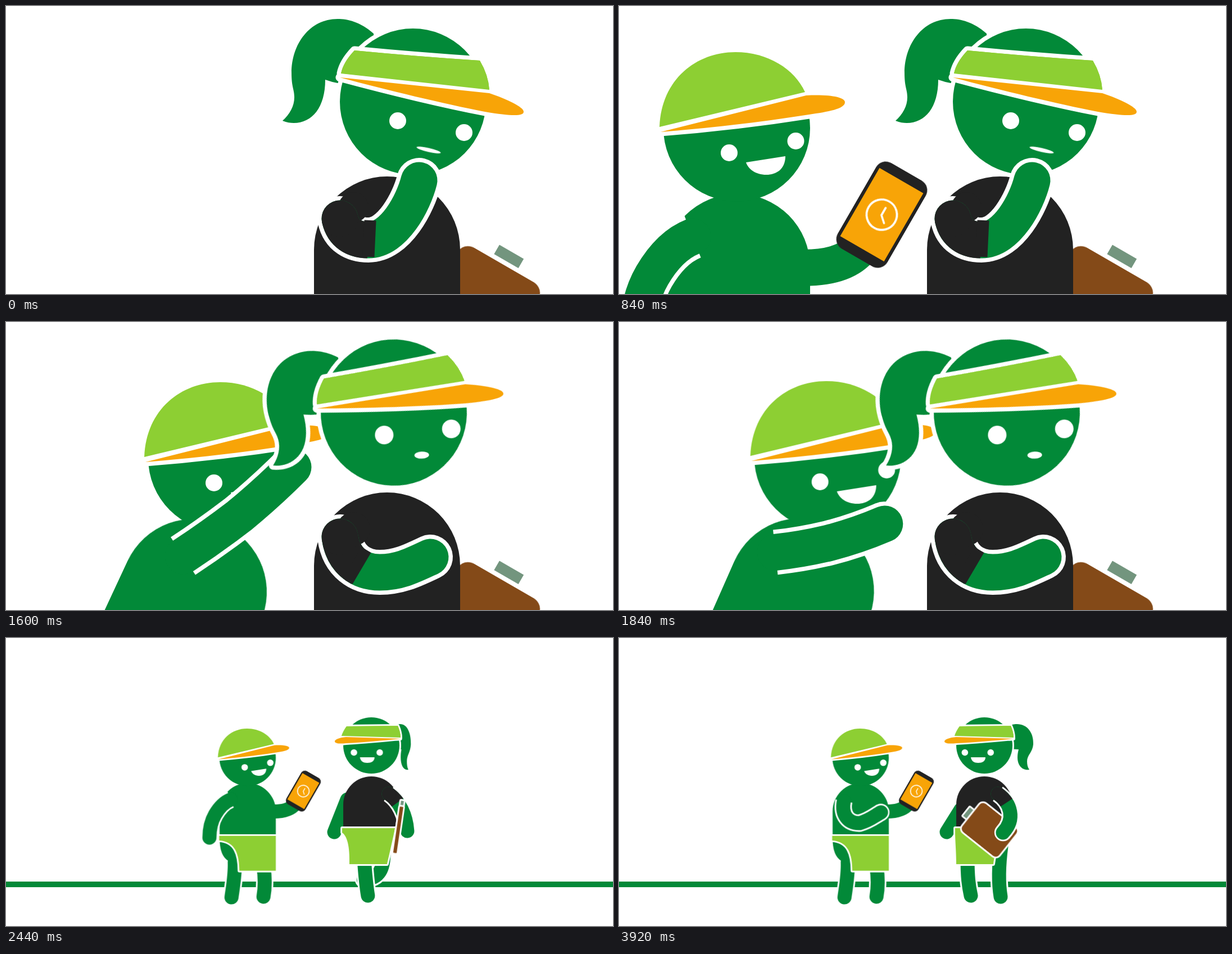
Recreate the animation shown at these times as an HTML page without scripts. Size 1080 by 512 pixels, loop 3960 ms.

```html
<!DOCTYPE html>
<html lang="en">
<head>
<meta charset="utf-8">
<title>Two friends meet</title>
<style>
html,body{margin:0;width:100%;height:100%;overflow:hidden;background:#fff}
svg{display:block;width:100vw;height:100vh}
svg *{animation:3.96s linear infinite}

/* paint */
.g{fill:#028938}.l{fill:#8dcf33}.o{fill:#f8a407}.k{fill:#222}.w{fill:#fff}
.brown{fill:#844a18}.grip{fill:#73957e}
.edge{stroke:#fff;stroke-width:15;paint-order:stroke;stroke-linejoin:round}
.small .edge{stroke-width:5.8}

/* limbs are thick strokes: white rim, green skin, dark sleeve */
.rim,.tip,.skin,.sleeve,.knob{fill:none;stroke-width:65}
.rim,.tip{stroke:#fff;stroke-width:80}
.skin{stroke:#028938;stroke-linecap:round}
.tip,.knob,.round{stroke-linecap:round}
.tip{stroke-dasharray:0 200;stroke-dashoffset:-99.5}
.sleeve,.knob{stroke:#222}
.sleeve{stroke-dasharray:68 999}
.knob{stroke-dasharray:0 999}
.small .rim,.small .tip{stroke-width:31}
.small .skin,.small .sleeve,.small .knob{stroke-width:25}
.small .sleeve{stroke-dasharray:22 999}

/* camera */
.cam{transform-origin:632.5px 210.4px;animation-name:cam}
@keyframes cam{0%,49.2%{transform:none}61.6%,to{transform:scale(.3846)}}
.right{animation-name:leave}
.left{animation-name:arrive}
@keyframes leave{0%,57.6%{opacity:1}57.61%,to{opacity:0}}
@keyframes arrive{0%,57.6%{opacity:0}57.61%,to{opacity:1}}

/* man */
.man{animation-name:man}
@keyframes man{
 0%{transform:translateX(-570px);animation-timing-function:cubic-bezier(.25,.6,.35,1)}
 17%,53.54%{transform:none}
 61.6%,to{transform:translateX(-104px)}}
.mhead{animation-name:mhead}
@keyframes mhead{
 0%,23.2%{transform:none;animation-timing-function:ease-in-out}
 34.3%,45.45%{transform:translate(174px,25px)}
 53.54%{transform:translate(78px,10px)}
 61.6%,to{transform:none}}
.mbody{transform-origin:210px 464px;animation-name:mbody}
@keyframes mbody{
 0%,23.2%{transform:translate(0,0) rotate(0deg);animation-timing-function:ease-in-out}
 34.3%,45.45%{transform:translate(124px,16px) rotate(25deg)}
 53.54%{transform:translate(44px,6px) rotate(16deg)}
 61.6%,to{transform:translate(0,0) rotate(0deg)}}
.marm{animation-name:marm}
@keyframes marm{
 0%,23.2%{d:path("M131 410C98 423 76 450 59 479C41 510 33 546 33 586");animation-timing-function:ease-in-out}
 34.3%,42.4%{d:path("M315 416C347 395 381 371 415 345C448 318 480 289 511 258")}
 53.54%{d:path("M215 398C237 426 266 453 299 476C332 500 368 519 407 533")}
 61.6%,77.3%{d:path("M131 410C98 423 76 450 59 479C41 510 33 546 33 586")}
 80.8%{d:path("M127 412C111 443 106 490 111 514C119 547 171 529 202 514")}
 88%,to{d:path("M132 417C119 482 153 521 205 519C249 508 275 485 304 469")}}
.far{animation-name:far}
@keyframes far{
 0%,23.2%{d:path("M300 464C370 470 410 455 430 430")}
 34.3%,45.45%{d:path("M340 520C370 560 400 610 450 650")}
 53.54%{d:path("M270 520C330 545 390 560 450 548")}
 61.6%,88%,93%,99%,to{d:path("M300 464C370 470 410 455 430 430")}
 90.5%,96%{d:path("M300 464C370 468 410 440 430 410")}}
.phone{animation-name:phone}
@keyframes phone{
 0%,23.2%{transform:translate(467.5px,371px) rotate(30deg)}
 34.3%,45.45%{transform:translate(480px,660px) rotate(70deg)}
 53.54%{transform:translate(512px,523px) rotate(66deg)}
 61.6%,88%,93%,99%,to{transform:translate(467.5px,371px) rotate(30deg)}
 90.5%,96%{transform:translate(467.5px,351px) rotate(30deg)}}

/* woman facing right */
.head{transform-origin:724px 170px;animation-name:head}
@keyframes head{
 0%,35.35%{transform:translate(0,0) rotate(0deg);animation-timing-function:ease-in-out}
 40.4%,49.2%{transform:translate(-34px,-9px) rotate(-15.3deg)}
 53.54%,to{transform:translate(-36.5px,-9.5px) rotate(-14deg)}}
.pony{animation-name:pony}
@keyframes pony{0%,49.2%{transform:none}53.54%{transform:translate(73px,28px)}57.6%,to{transform:translate(145px,45px)}}
.brim{transform-origin:594px 127px;animation-name:brim}
@keyframes brim{0%,49.2%{transform:rotate(0deg) scale(1,1)}53.54%{transform:rotate(-1.3deg) scale(.93,1.07)}57.6%,to{transform:rotate(-2deg) scale(.84,1.1)}}
.face{animation-name:face}
@keyframes face{0%,49.2%{transform:none}53.54%{transform:translateX(-10px)}57.6%,to{transform:translateX(-28px)}}
.eye{r:15px;animation-name:eye}
@keyframes eye{0%,35.35%{r:15px}40.4%,49.2%{r:16.5px}53.54%,to{r:15px}}
.lips{transform-origin:752px 256px;animation-name:lips}
@keyframes lips{0%,35.35%{transform:rotate(13deg) scale(1,1)}40.4%,49.2%{transform:rotate(13deg) scale(.59,1.8)}53.54%,to{transform:rotate(13deg) scale(.46,2.1)}}
.arm{animation-name:arm}
@keyframes arm{
 0%,35.35%{d:path("M594 378C600 405 620 416 645 416C690 416 725 350 735 310");animation-timing-function:ease-in-out}
 40.4%,49.2%{d:path("M594 382C600 425 630 445 665 445C700 445 725 432 755 418")}
 53.54%,to{d:path("M594 378C575 388 560 405 547 427C530 458 520 500 515 555")}}
.cuff{animation-name:cuff}
@keyframes cuff{
 0%,35.35%{d:path("M636 413L657 414");animation-timing-function:ease-in-out}
 40.4%,49.2%{d:path("M616 428L633 438")}
 53.54%,to{d:path("M555 407L547 427")}}
.patch{animation-name:patch}
@keyframes patch{0%,35.35%{cx:618px;cy:358px;r:27px}40.4%,49.2%{cx:618px;cy:368px;r:30px}53.54%,to{cx:615px;cy:395px;r:38px}}
.bag{animation-name:bag}
@keyframes bag{0%,49.2%{transform:translate(832px,554px) rotate(30deg)}53.54%,to{transform:translate(840px,552px) rotate(30deg)}}

/* woman facing left */
.pony2{transform-origin:690px 190px;animation-name:pony2}
@keyframes pony2{0%,57.6%{transform:scaleX(.2)}61.6%{transform:scaleX(.64)}65%,to{transform:none}}
.brim2{transform-origin:702px 179px;animation-name:brim2}
@keyframes brim2{0%,57.6%{transform:scaleX(.88)}61.6%{transform:scaleX(.952)}65%,to{transform:none}}
.face2{animation-name:face2}
@keyframes face2{0%,57.6%{transform:translateX(14px)}61.6%{transform:translateX(3.7px)}65%,to{transform:none}}
.leg1{animation-name:leg1}
@keyframes leg1{0%,61.6%{d:path("M637 390C639 420 641 440 644 458")}68.2%,to{d:path("M620 390C620 425 622 440 626 458")}}
.leg2{animation-name:leg2}
@keyframes leg2{0%,61.6%{d:path("M672 380C672 410 665 428 636 429")}68.2%,to{d:path("M680 370C676 400 674 430 679 460")}}
.shorts{animation-name:shorts}
@keyframes shorts{
 0%,61.6%{d:path("M598 338L692 338C690 350 682 385 678 402L611 402C612 370 607 352 598 346Z")}
 68.2%,to{d:path("M598 338L697 338C681 350 669 375 666 402L600 402C600 380 598 360 598 346Z")}}
.back{animation-name:back}
@keyframes back{0%,61.6%{d:path("M607 287L584 345")}68.2%,to{d:path("M608 305L583 345")}}
.arm2{animation-name:arm2}
@keyframes arm2{
 0%,61.6%{d:path("M681 277C700 290 712 315 714 343")}
 73.2%,to{d:path("M674 277C697 293 706 322 683 346")}}
.case{animation-name:case}
@keyframes case{0%,61.6%{transform:translate(698px,341px) rotate(8.5deg)}73.2%,to{transform:translate(659px,341px) rotate(-51.5deg)}}
.shell{animation-name:shell}
@keyframes shell{0%,61.6%{x:-3px;width:6px;rx:1px}73.2%,to{x:-32px;width:64px;rx:8px}}
.hold{animation-name:hold}
@keyframes hold{0%,61.6%{x:-2.5px;width:5px}73.2%,to{x:-9.6px;width:19.2px}}
.over{animation-name:over}
@keyframes over{0%,66%{opacity:1}66.01%,to{opacity:0}}
</style>
</head>
<body>
<svg viewBox="0 0 1080 512">
<defs>
 <g id="legs">
  <path class="rim round" d="M283 720C292 780 290 820 283 859"/>
  <path class="skin" d="M283 720C292 780 290 820 283 859"/>
  <path class="rim round" d="M150 700C152 760 142 810 135 862"/>
  <path class="skin" d="M150 700C152 760 142 810 135 862"/>
  <path class="g" d="M80 595C82 650 95 675 118 692L170 710V595Z"/>
  <path class="l edge" d="M78 578H340V739H171C171 664 153 604 78 599Z"/>
 </g>
</defs>

<g class="cam">
 <path d="M-1100 802H1900" stroke="#028938" stroke-width="26"/>

 <g class="man">
  <path class="skin far" d="M300 464C370 470 410 455 430 430"/>
  <g class="phone">
   <rect class="k" x="-51" y="-88" width="102" height="176" rx="20"/>
   <rect class="o" x="-45" y="-70" width="90" height="140"/>
   <g fill="none" stroke="#fff" stroke-width="3.7">
    <circle r="27"/>
    <path d="M0-14V1L11 11" stroke-linecap="round"/>
   </g>
  </g>
  <g class="mbody">
   <path class="g" d="M80 573V464A130 130 0 0 1 340 464V573Z"/>
   <use href="#legs"/>
  </g>
  <g class="mhead">
   <circle class="g" cx="209.5" cy="217" r="130.5"/>
   <path class="w" d="M60 229L72 215C75 130 140 74 208 74C265 74 345 112 345 165L338 198L76 229Z"/>
   <path class="o edge" d="M74 224L333 159C375 157 402 162 402 171C402 183 372 188 338 193C250 207 150 218 74 224Z"/>
   <path class="l" d="M72 215C75 130 138 82 207 82C265 82 312 112 331 153Z"/>
   <circle class="w" cx="196" cy="261" r="15"/>
   <circle class="w" cx="314.5" cy="240" r="15"/>
   <path class="w" d="M226 278L296 267C296 290 280 300 262 300C243 300 230 290 226 278Z"/>
  </g>
  <path class="rim marm"/>
  <path class="tip marm" pathLength="100"/>
  <path class="skin marm"/>
 </g>

 <g class="right">
  <g class="bag">
   <rect class="grip" x="-25" y="-135" width="50" height="19"/>
   <rect class="brown" x="-83" y="-108" width="166" height="216" rx="21.5"/>
  </g>
  <use href="#legs" x="468" y="-36"/>
  <path class="k" d="M548 536V433A130 130 0 0 1 808 433V536Z"/>
  <g class="head">
   <path class="g edge pony" d="M654 49C630 28 608 23 590 23C540 23 508 68 508 119C508 145 513 148 513 162C513 178 505 192 492 204C500 207 506 208 512 208C545 208 568 180 568 131Q579 135 590 137L660 120Z"/>
   <circle class="g edge" cx="724" cy="170" r="130"/>
   <path class="l edge" d="M620 79Q735 90 843 97Q858 122 860 149L596 120Q600 100 620 79Z"/>
   <path class="o edge brim" d="M594 127L860 155C890 165 922 180 921 188C921 196 900 196 852 188C780 174 680 150 594 127Z"/>
   <path class="l" d="M620 79Q735 90 843 97Q858 122 860 149L596 120Q600 100 620 79Z"/>
   <g class="face">
    <circle class="w eye" cx="697" cy="204"/>
    <circle class="w eye" cx="815" cy="225"/>
    <ellipse class="w lips" cx="752" cy="256" rx="22" ry="3.5"/>
   </g>
  </g>
  <path class="rim round arm"/>
  <circle class="k patch"/>
  <path class="skin arm"/>
  <path class="sleeve arm"/>
  <path class="sleeve cuff"/>
  <path class="knob arm"/>
 </g>

 <g class="left small" transform="translate(-1012 -336.6) scale(2.6)">
  <path class="skin back"/>
  <path class="rim round leg2"/>
  <path class="skin leg2"/>
  <path class="rim round leg1"/>
  <path class="skin leg1"/>
  <path class="k" d="M600 338V296A50 50 0 0 1 700 296L693 338Z"/>
  <path class="l edge shorts"/>
  <path class="g edge pony2" d="M694 156C700 153 705 153 708 153C726 153 738 168 737 189C736 203 726 208 726 219C726 225 727 230 730 234C717 236 709 226 709 212C709 206 710 202 711 198L690 197Z"/>
  <circle class="g edge" cx="650" cy="191" r="50"/>
  <path class="l edge" d="M606 157L697 156C700 163 702 170 702 177L597 174C599 168 602 162 606 157Z"/>
  <path class="o edge brim2" d="M702 179L600 176C588 177 579 180 579 184C580 188 590 188 600 187C630 186 670 182 702 179Z"/>
  <path class="l" d="M606 157L697 156C700 163 702 170 702 177L597 174C599 168 602 162 606 157Z"/>
  <g class="face2">
   <circle class="w" cx="615.3" cy="203.5" r="5.8"/>
   <circle class="w" cx="661.2" cy="203.5" r="5.8"/>
   <path class="w" d="M626 212H652C652 219 646 222 639 222C632 222 627 219 626 212Z"/>
  </g>
  <g class="case">
   <rect class="grip edge hold" x="-9.6" y="-52" width="19.2" height="8"/>
   <rect class="brown edge shell" x="-32" y="-41.5" width="64" height="83" rx="8"/>
  </g>
  <path class="rim arm2"/>
  <path class="tip arm2" pathLength="100"/>
  <path class="skin arm2"/>
  <path class="sleeve arm2"/>
  <path class="knob arm2"/>
  <!-- while seen edge-on the case hangs in front of the arm -->
  <g class="over"><g class="case">
   <rect class="grip edge hold" x="-9.6" y="-52" width="19.2" height="8"/>
   <rect class="brown edge shell" x="-32" y="-41.5" width="64" height="83" rx="8"/>
  </g></g>
 </g>
</g>
</svg>
</body>
</html>
```
